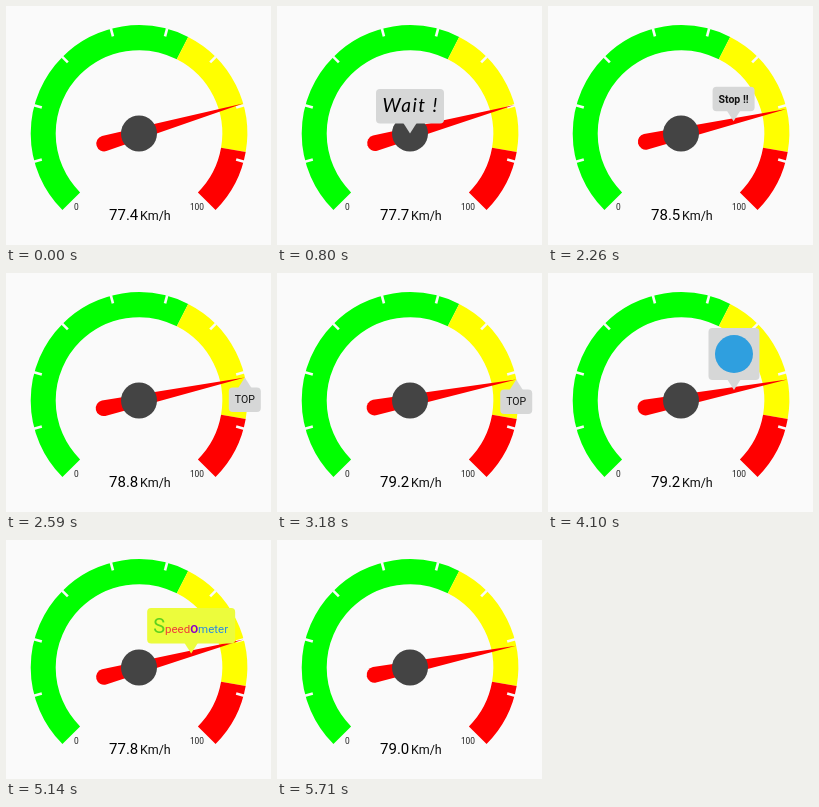
An HTML page with a canvas for the animation above (5730 ms loop, 265x239 px).

```html
<!DOCTYPE html>
<html>
<head>
<meta charset="utf-8">
<style>
  html, body { margin: 0; width: 100%; height: 100%; overflow: hidden; background: #fafafa; }
  canvas { display: block; }
</style>
</head>
<body>
<canvas id="stage"></canvas>
<script>
const W = 265, H = 239, LOOP = 5730;
const CX = 133, CY = 127.5, R = 108.3, BAND = 25;
const RAD = Math.PI / 180, GREY = '#d6d7d7';
const canvas = document.getElementById('stage');
const ctx = canvas.getContext('2d');
const ratio = window.devicePixelRatio || 1;
canvas.width = W * ratio;
canvas.height = H * ratio;
canvas.style.width = W + 'px';
canvas.style.height = H + 'px';

// Speed moves: start ms, end ms, from, to
const moves = [
  [100, 1050, 77.4, 77.72],
  [1050, 3500, 77.72, 79.24],
  [4050, 4700, 79.24, 77.1],
  [4700, 5800, 77.1, 79.05],
];

// Each note hangs on the needle at distance `at` from the hub
const notes = [
  { from: 740, to: 1590, at: 0, w: 68, h: 34.5, draw: (x, y) => {
    ctx.letterSpacing = '1.5px';
    text('Wait !', x + .7, y + 6, 'italic 19px Lato, sans-serif', '#000', 'center');
    ctx.letterSpacing = '0px';
  } },
  { from: 1590, to: 2500, at: 54, w: 42, h: 24.5, draw: (x, y) =>
    text('Stop !!', x, y + 3.8, 'bold 10.5px Roboto, sans-serif', '#111', 'center') },
  { from: 2500, to: 3290, at: R, w: 32, h: 24.5, below: true, draw: (x, y) =>
    text('TOP', x, y + 3.8, '10.5px Roboto, sans-serif', '#111', 'center') },
  { from: 3290, to: 4220, at: 54, w: 51, h: 52, draw: (x, y) => disc(x, y, 19, '#2f9fdf') },
  { from: 4400, to: 5410, at: 54, w: 88, h: 35.5, color: '#ecfc3c', draw: drawRichText },
];

function ease(p) {
  p = Math.min(1, Math.max(0, p));
  return (1 - Math.cos(p * Math.PI)) / 2;
}

function speedAt(t) {
  const [start, end, a, b] = moves.filter(m => m[0] <= t).pop() || moves[0];
  return a + (b - a) * ease((t - start) / (end - start));
}

const angleOf = speed => (135 + 2.7 * speed) * RAD;

function text(str, x, y, font, color, align = 'left') {
  ctx.font = font;
  ctx.fillStyle = color;
  ctx.textAlign = align;
  ctx.fillText(str, x, y);
  return ctx.measureText(str).width;
}

function disc(x, y, r, color) {
  ctx.fillStyle = color;
  ctx.beginPath();
  ctx.arc(x, y, r, 0, 2 * Math.PI);
  ctx.fill();
}

function drawRichText(x, y) {
  const parts = [
    ['S', '20px', '#5fd21e'],
    ['peed', '11.5px', '#f03a3a'],
    ['O', 'bold 11.5px', '#8a00c8'],
    ['meter', '11.5px', '#2a8ae0'],
  ];
  x -= 38;
  for (const [str, size, color] of parts) {
    x += text(str, x, y + 7, size + ' Roboto, sans-serif', color);
  }
}

function drawDial() {
  ctx.lineWidth = BAND;
  for (const [a, b, color] of [[0, 60, '#0f0'], [60, 87, '#ff0'], [87, 100, '#f00']]) {
    ctx.strokeStyle = color;
    ctx.beginPath();
    ctx.arc(CX, CY, R - BAND / 2, angleOf(a), angleOf(b));
    ctx.stroke();
  }
  ctx.fillStyle = '#fafafa';
  for (let deg = 165; deg <= 375; deg += 30) {
    ctx.save();
    ctx.translate(CX, CY);
    ctx.rotate(deg * RAD);
    ctx.fillRect(R - 7.7, -1.3, 8.2, 2.6);
    ctx.restore();
  }
  text('0', 68, 204, '8.4px Roboto, sans-serif', '#222');
  text('100', 198, 204, '8.4px Roboto, sans-serif', '#222', 'right');
}

function drawNeedle(angle) {
  const tail = -36.2, r = 7.9;
  ctx.save();
  ctx.translate(CX, CY);
  ctx.rotate(angle);
  ctx.fillStyle = '#f00';
  ctx.beginPath();
  ctx.moveTo(R, 0);
  ctx.lineTo(tail, r);
  ctx.arc(tail, 0, r, Math.PI / 2, Math.PI * 1.5);
  ctx.fill();
  ctx.restore();
  disc(CX, CY, 18, '#444');
}

function drawNote(note, angle) {
  const { w, h, at, below, color = GREY } = note;
  const x = CX + at * Math.cos(angle), y = CY + at * Math.sin(angle);
  const dir = below ? 1 : -1;
  const edge = y + dir * 10, mid = edge + dir * h / 2;
  ctx.fillStyle = color;
  ctx.beginPath();
  ctx.roundRect(x - w / 2, mid - h / 2, w, h, 4);
  ctx.fill();
  ctx.beginPath();
  ctx.moveTo(x, y);
  ctx.lineTo(x - 7, edge + dir);
  ctx.lineTo(x + 7, edge + dir);
  ctx.fill();
  note.draw(x, mid);
}

function render(now) {
  const t = now % LOOP, speed = speedAt(t), angle = angleOf(speed);
  ctx.setTransform(ratio, 0, 0, ratio, 0, 0);
  ctx.fillStyle = '#fafafa';
  ctx.fillRect(0, 0, W, H);
  drawDial();
  drawNeedle(angle);
  text(speed.toFixed(1), 132.3, 214, '15px Roboto, sans-serif', '#000', 'right');
  text('Km/h', 134, 214, '12.5px Roboto, sans-serif', '#111');
  const note = notes.find(n => t >= n.from && t < n.to);
  if (note) drawNote(note, angle);
}

const begin = performance.now();
function tick() {
  render(performance.now() - begin);
  requestAnimationFrame(tick);
}
tick();
</script>
</body>
</html>
```
